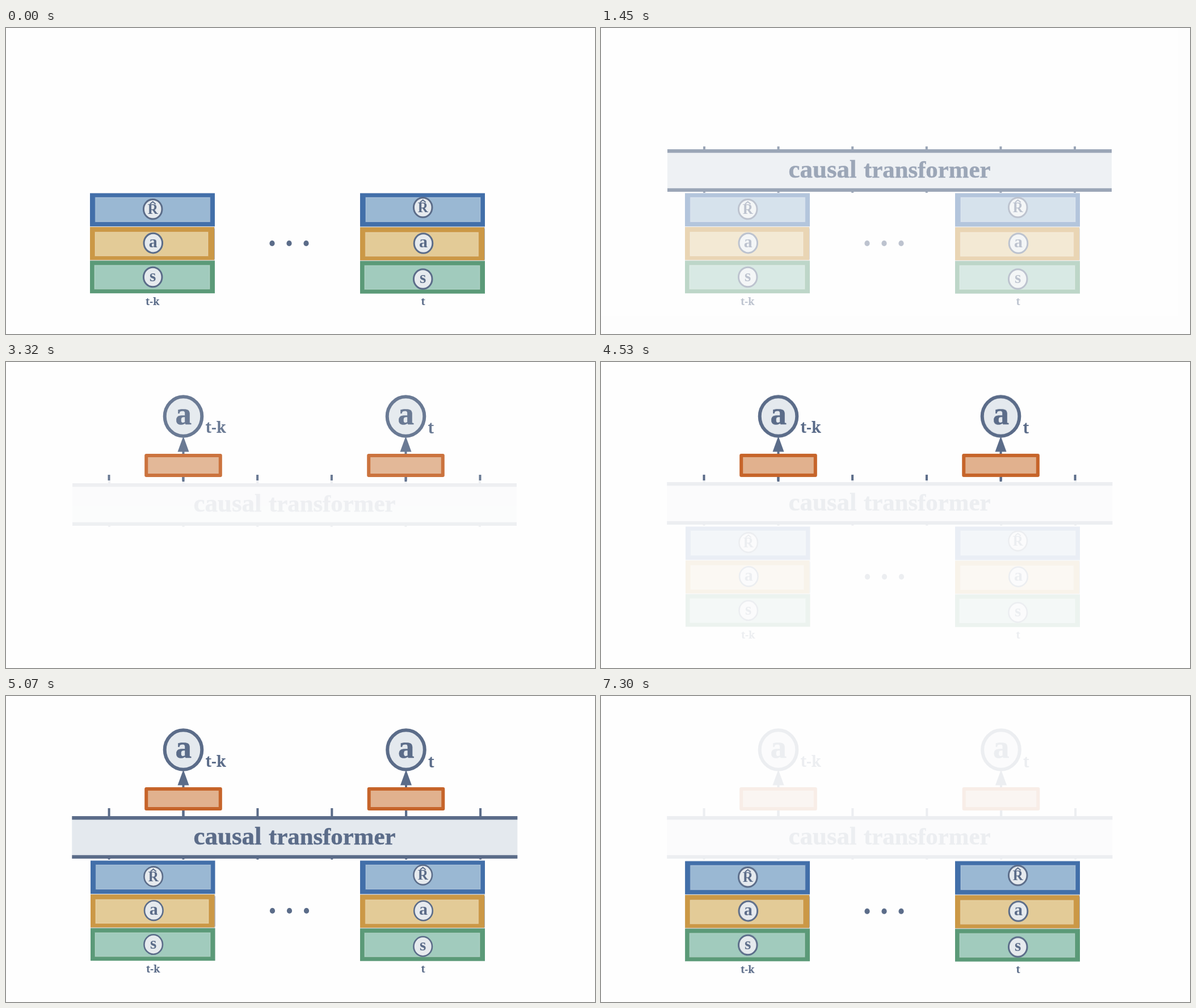
An HTML page that plays this animation: 1038 by 540 pixels, repeating every 7360 ms.

```html
<!DOCTYPE html>
<html lang="en">
<head>
<meta charset="utf-8">
<title>Causal transformer</title>
<style>
  html, body { margin: 0; width: 100%; height: 100%; overflow: hidden; background: #fefefe; }
  svg { display: block; width: 100%; height: 100%; }
  text { font-family: "Liberation Serif", "Times New Roman", serif; font-weight: bold; fill: #5b6c89; }
  .slab { font-family: "Noto Serif", serif; }
  .mid { text-anchor: middle; }
</style>
</head>
<body>
<svg id="stage" viewBox="0 0 1038 540"></svg>
<script>
const INK = '#5b6c89', PALE = '#e4e9ee';
const LOOP = 7360, STEP = 60, STEPS = 10;
const STARTS = [1150, 2840, 4530, 6820];

const rect = (x, y, w, h, fill, extra = '') =>
  `<rect x="${x}" y="${y}" width="${w}" height="${h}" fill="${fill}" ${extra}/>`;
const oval = (x, y, rx, ry, fill, line = 0) =>
  `<ellipse cx="${x}" cy="${y}" rx="${rx}" ry="${ry}" fill="${fill}" stroke="${INK}" stroke-width="${line}"/>`;
const text = (s, x, y, size, cls = '', extra = '') =>
  `<text x="${x}" y="${y}" font-size="${size}" class="${cls}" ${extra}>${s}</text>`;
const shift = (x, y, body) => `<g transform="translate(${x} ${y})">${body}</g>`;

// One coloured row of a stack; inner = [x, y, w, h] relative to the row
function row(x, y, w, h, edge, fill, inner) {
  const [ix, iy, iw, ih] = inner;
  return rect(x, y, w, h, edge) +
    rect(x + ix, y + iy, iw, ih, fill, 'stroke="#fff" stroke-opacity=".22" stroke-width="1.6"');
}

function badge(letter, x, y, size, drop, line) {
  const hat = letter === 'R'
    ? `<path d="M${x - 5} ${y - 9}l5 -4.2l5 4.2" fill="none" stroke="${INK}" stroke-width="1.9"/>` : '';
  return oval(x, y, 16.3, 17.3, '#e6eaee', line) + text(letter, x, y + drop, size, 'mid') + hat;
}

function leftStack(line, w) {
  return rect(148, 351, w, 117, '#d6d8da') + rect(366.5, 354, 1.3, 54, '#9a9caa') +
    row(148, 291.5, w, 58.7, '#426fa9', '#9ab8d3', [9.5, 7.5, 202, 43]) +
    row(148, 351.2, w - 1, 58.2, '#cb9846', '#e3cb97', [9, 9, 199, 42]) +
    row(148, 410.7, w, 57.5, '#5b9a78', '#a1cbbd', [8, 8, 203, 42]) +
    badge('R', 258.7, 319.7, 25, 8.3, line) +
    badge('a', 259.3, 379.6, 30, 7.4, line) +
    badge('s', 258.7, 439.5, 29, 7.3, line) +
    text('t-k', 258.2, 489, 18.2, 'slab mid');
}

function rightStack(line) {
  return rect(624, 351, 220, 117, '#d6d8da') + rect(842.5, 354, 1.3, 55, '#9a9caa') +
    row(624, 291.5, 220, 59, '#426fa9', '#9ab8d3', [10, 7.5, 202, 43]) +
    row(624, 351.7, 219, 58.2, '#cb9846', '#e3cb97', [9.5, 9, 199, 42]) +
    row(624, 411.2, 220, 57.5, '#5b9a78', '#a1cbbd', [8, 8, 203, 42]) +
    badge('R', 734.7, 316.8, 25, 8.5, line) +
    badge('a', 735.5, 380, 30, 7.4, line) +
    badge('s', 734.7, 443, 29, 7.3, line) +
    text('t', 735.3, 489, 18.2, 'slab mid');
}

const dots = [469, 499, 529].map(x => oval(x, 380, 4.6, 5.1, INK)).join('');

const ticks = (x, gap, y, h) =>
  Array.from({ length: 6 }, (_, i) => rect(x + gap * i - 2, y, 4, h, INK)).join('');

function band(x, w, y, base) {
  return rect(x, y, w, 75, PALE) + rect(x, y, w, 6.3, INK) + rect(x, y + 68.8, w, 6.2, INK) +
    text('causal', 330.5, base, 45, '', `stroke="${INK}" stroke-width=".5"`) +
    text('transformer', 463, base, 42.8, '', `stroke="${INK}" stroke-width=".5"`);
}

function head(x, label, labelX, labelY, stem) {
  return rect(x - 2, 155, 4, 8, INK) + rect(x - 2, 202, 4, stem, INK) +
    `<path d="M${x} 131l10 27.5h-20z" fill="${INK}"/>` +
    rect(x - 65.3, 165, 130.6, 35, '#e1b18e', 'stroke="#c6642a" stroke-width="6" stroke-linejoin="round"') +
    oval(x, 96, 32.8, 34.7, PALE, 6) +
    text('a', x + .3, 110, 57, 'mid', `stroke="${INK}" stroke-width=".6"`) +
    text(label, labelX, labelY, 26.8, 'slab');
}

const slides = [
  leftStack(3, 220) + rightStack(3) + dots,
  ticks(182, 130.6, 209, 6) + ticks(182, 130.6, 288, 2.8) + band(117, 783, 214, 264),
  ticks(181.5, 130.8, 199, 10) + head(312.5, 't-k', 351.5, 125, 9) + head(704.5, 't', 743.5, 126, 9),
  shift(1, -1, leftStack(2.6, 219.5)) + shift(0, -1, rightStack(2.6)) + shift(.5, -1, dots) +
    ticks(181.6, 130.9, 198, 15) + ticks(181.6, 130.9, 286, 2.6) + band(116.3, 785, 212, 262) +
    shift(0, -1, head(312.5, 't-k', 351.5, 126, 11) + head(705, 't', 744, 127, 11))
];

const stage = document.getElementById('stage');
stage.innerHTML = slides.map(s => `<g>${rect(0, 0, 1038, 540, '#fefefe')}${s}</g>`).join('');
const layers = [...stage.children];

function draw(ms) {
  const t = ms % LOOP;
  let from = 0, mix = 0;
  STARTS.forEach((start, i) => {
    if (t >= start) {
      from = i;
      mix = Math.min(STEPS, Math.floor((t - start) / STEP) + 1) / STEPS;
    }
  });
  const to = (from + 1) % layers.length;
  // The lower layer stays solid, the upper one carries the blend
  const low = Math.min(from, to), high = Math.max(from, to);
  layers.forEach((g, i) => {
    const alpha = i === low ? 1 : i === high ? (high === to ? mix : 1 - mix) : 0;
    g.setAttribute('opacity', alpha);
  });
}

const begin = performance.now();
function tick() {
  draw(performance.now() - begin);
  requestAnimationFrame(tick);
}
tick();
</script>
</body>
</html>
```
